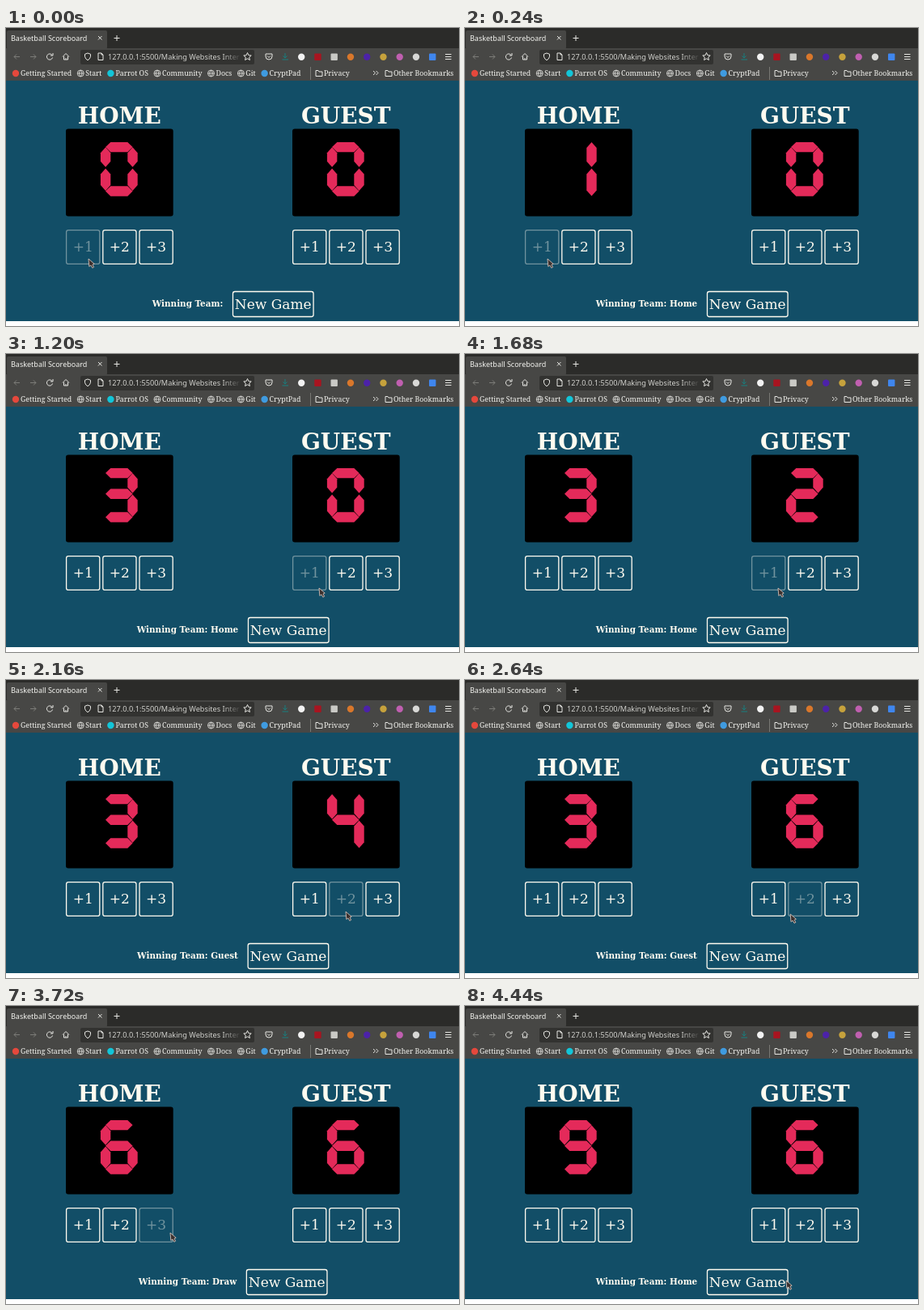
Write an HTML page that moves like this. It is 560 by 368 pixels and loops after 4.56 s.

```html
<!DOCTYPE html>
<html lang="en">
<head>
<meta charset="utf-8">
<title>Basketball Scoreboard</title>
<style>
  html, body { margin: 0; width: 100%; height: 100%; overflow: hidden; background: #fff; }
  svg { display: block; width: 560px; height: 368px; }
  .ui { font: 9px "Noto Sans", "Open Sans", sans-serif; fill: #f4f4f0; }
  .marks { font: 8.85px "Noto Serif", "DejaVu Serif", serif; fill: #f4f4f0; }
  .line { fill: none; stroke: #e6e6e2; }
  .page { font: 17px "DejaVu Serif", "Noto Serif", serif; fill: #fffbf0; text-anchor: middle; }
  .title { font-size: 28px; font-weight: bold; }
  .box { fill: none; stroke: #fffbf0; stroke-width: 1.3; }
  #label { font-size: 10.4px; font-weight: bold; text-anchor: start; }
  .hover { opacity: .4; }
  .digit { fill: #e42a5a; }
</style>
</head>
<body>
<svg viewBox="0 0 560 368">
  <defs>
    <linearGradient id="fade"><stop stop-color="#323230" stop-opacity="0"/><stop offset="1" stop-color="#323230"/></linearGradient>
    <path id="globe" class="line" stroke-width=".8" d="M-4 0a4 4 0 1 0 8 0a4 4 0 1 0-8 0h8M0-4q-3.500 4 0 8q3.500-4 0-8"/>
    <path id="folder" class="line" d="M-4 3.500v-7h3l1 1.500h4v5.500z"/>
  </defs>
  <rect width="560" height="25" fill="#2b2b29"/>
  <rect y="25" width="560" height="41" fill="#474745"/>
  <rect x="1" y="3" width="124" height="23" rx="2" fill="#474745"/>
  <rect x="92" y="27" width="215" height="18" rx="2" fill="#323230"/>
  <g class="ui">
    <text x="6" y="15.500">Basketball Scoreboard</text>
    <text x="126" y="38.700" font-size="9.200" fill="#d2d2ce">127.0.0.1:5500/Making Websites Inter</text>
  </g>
  <rect x="268" y="29" width="23" height="14" fill="url(#fade)"/>

  <g class="line">
    <path d="M114 10l4.500 4.500m0-4.500l-4.500 4.500M133.500 12.500h7m-3.500-3.500v7"/>
    <path d="M17 35.500h-7m3-3l-3 3 3 3M30 35.500h7m-3-3l3 3-3 3" stroke="#7d7d79"/>
    <path d="M57 33.500a3.600 3.600 0 1 0 .5 3M58 31v3h-3"/>
    <path d="M70 35.500l4-4 4 4M71.500 35v4h5v-4M74 39v-2"/>
    <path d="M101 31l3.500 1.300v3q-.6 3-3.500 4.500-2.900-1.500-3.500-4.500v-3z"/>
    <path d="M114 31h4l2 2v6.500h-6zM118 31v2h2"/>
    <path d="M298.500 30.500l1.400 3.100 3.300.4-2.500 2.200.7 3.300-2.900-1.700-2.900 1.700.7-3.300-2.500-2.200 3.300-.4z"/>
    <path d="M321 32h8v3a4 4 0 0 1-8 0zM323 34.500l2 2 2-2"/>
    <path d="M341.500 39h7.500M345 31v6m-2.500-2.500l2.500 2.500 2.500-2.500" stroke="#168080"/>
    <path d="M543 32.500h7.500m-7.500 3h7.500m-7.500 3h7.500"/>
    <path d="M376.500 48v16" stroke="#777773"/>
    <path d="M454 53l2.500 2.500-2.500 2.500m3.500-5l2.500 2.500-2.500 2.500"/>
  </g>
  <g id="badges"></g>
  <g id="bookmarks" class="marks"></g>

  <rect y="65" width="560" height="297" fill="#124e67"/>
  <g class="page">
    <g id="teams"></g>
    <text id="label" y="344"></text>
    <g id="newGame">
      <rect class="box" x=".7" y="325.500" width="99.600" height="31" rx="2.500"/>
      <text x="50.500" y="347">New Game</text>
    </g>
  </g>
  <path id="cursor" d="M0 0L.8 9.500 2.900 8 4.800 11.300 6.600 10.300 5 7.200 7.200 6.300Z"
        fill="#3b302e" stroke="#e6d0c6" stroke-width=".8" stroke-linejoin="round"/>
</svg>
<script>
const $ = id => document.getElementById(id);
const LOOP = 4560, TICK = 120;

function add(parent, tag, attrs, text) {
  const el = document.createElementNS("http://www.w3.org/2000/svg", tag);
  for (const key in attrs) el.setAttribute(key, attrs[key]);
  if (text) el.textContent = text;
  return parent.appendChild(el);
}

// Toolbar badges: evenly spaced discs and squares
"●#f2f2f2 ■#a81420 ■#c9c9c5 ●#d9772b ●#4c22a8 ●#c6a23c ●#c05fb0 ●#d8d8d6 ■#3f86ee".split(" ").forEach((badge, i) =>
  add($("badges"), "rect", {
    x: 361 + 20.25 * i, y: 31.5, width: 8.4, height: 8.4,
    rx: badge[0] === "●" ? 4.2 : 1, fill: badge.slice(1)
  }));

// Bookmarks flow from left to right, each as wide as its text
function addBookmarks(x, items) {
  for (const [name, icon] of items) {
    const g = add($("bookmarks"), "g", { transform: `translate(${x} 56)` });
    if (icon[0] === "#") add(g, "circle", { r: 4.2, fill: icon });
    else add(g, "use", { href: "#" + icon });
    x += add(g, "text", { x: 6, y: 3 }, name).getComputedTextLength() + 17;
  }
}
addBookmarks(12, [
  ["Getting Started", "#e5483c"], ["Start", "globe"], ["Parrot OS", "#12c5d8"], ["Community", "globe"],
  ["Docs", "globe"], ["Git", "globe"], ["CryptPad", "#3f9be0"]
]);
addBookmarks(387, [["Privacy", "folder"]]);
addBookmarks(473, [["Other Bookmarks", "folder"]]);

// Seven segments, lettered a to g in the usual order
const lit = ["abcdef", "bc", "abged", "abgcd", "fgbc", "afgcd", "afgedc", "abc", "abcdefg", "abcdfg"];
const MID_X = 139.8, MID_Y = 174.3, BAR = 6.2;

const flat = y => [[-16.8, 0], [-10.5, -BAR], [10.5, -BAR], [16.8, 0], [10.5, BAR], [-10.5, BAR]]
  .map(([dx, dy]) => [MID_X + dx, y + dy]);

function upright(x, top, bottom) {
  return [[x, top], [x + BAR, top + 7], [x + BAR, bottom - 7], [x, bottom], [x - BAR, bottom - 7], [x - BAR, top + 7]];
}

// An upright grows to fill the corner where no bar caps it
function segmentPoints(key, on) {
  const bar = "agd".indexOf(key);
  if (bar >= 0) return flat(MID_Y + (bar - 1) * 27.2 - (bar === 1 ? 1.5 : 0));
  const x = MID_X + ("bc".includes(key) ? 16.7 : -16.7);
  return "bf".includes(key)
    ? upright(x, on.includes("a") ? 147.3 : 141, 171.8)
    : upright(x, 173.5, on.includes("d") ? 201 : 207.5);
}

function makeTeam(name, dx) {
  const g = add($("teams"), "g", { transform: `translate(${dx})` });
  add(g, "text", { class: "title", x: 140.3, y: 118 }, name);
  add(g, "rect", { x: 74, y: 124.5, width: 132.7, height: 108, rx: 3, fill: "#000" });
  const digit = add(g, "g", { class: "digit" });
  const buttons = [1, 2, 3].map(points => {
    const x = 29.4 + 45.2 * points, el = add(g, "g", {});
    add(el, "rect", { class: "box", x, y: 249.6, width: 41.2, height: 41.8, rx: 2.5 });
    add(el, "text", { x: x + 20.6, y: 276 }, "+" + points);
    return { el, points, left: x + dx };
  });
  return { digit, buttons };
}
const home = makeTeam("HOME", 0), guest = makeTeam("GUEST", 280);

// Pointer: where it rests, and each eased move to a new spot along an arc
const rest = { x: 102, y: 285 };
const moves = [
  { from: 720, to: 1200, x: 387, y: 289, lift: 99 },
  { from: 1800, to: 2160, x: 420, y: 286, lift: 0 },
  { from: 2520, to: 3000, x: 135, y: 237, lift: -26 },
  { from: 3000, to: 3480, x: 203, y: 280, lift: 0 },
  { from: 3960, to: 4440, x: 397, y: 339, lift: 0 }
];
const clicks = [240, 480, 720, 1320, 1560, 2040, 2520, 3720, 3960];

const ease = k => k < .5 ? 4 * k ** 3 : 1 - 4 * (1 - k) ** 3;

function pointerAt(t) {
  let { x, y } = rest;
  for (const m of moves) {
    const k = ease(Math.min(1, Math.max(0, (t - m.from) / (m.to - m.from))));
    x += (m.x - x) * k;
    y += (m.y - y) * k - m.lift * 4 * k * (1 - k);
    if (k < 1) break;
  }
  return { x, y };
}

const isOver = (button, { x, y }) => x >= button.left && x <= button.left + 42 && y >= 249 && y <= 292;

// Each click adds the points of the button under the pointer
function scoreAt(team, t) {
  return clicks.filter(c => c <= t).reduce((sum, c) => {
    const hit = team.buttons.find(b => isOver(b, pointerAt(c)));
    return sum + (hit ? hit.points : 0);
  }, 0);
}

function showTeam(team, score, pointer) {
  const on = lit[score];
  team.digit.replaceChildren();
  for (const key of on) add(team.digit, "polygon", { points: segmentPoints(key, on).join(" ") });
  for (const b of team.buttons) b.el.classList.toggle("hover", isOver(b, pointer));
}

function draw(t) {
  const pointer = pointerAt(t), h = scoreAt(home, t), g = scoreAt(guest, t);
  showTeam(home, h, pointer);
  showTeam(guest, g, pointer);
  const winner = h > g ? " Home" : g > h ? " Guest" : h ? " Draw" : "";
  $("label").textContent = "Winning Team:" + winner;
  const width = $("label").getComputedTextLength(), left = 280.2 - (width + 111.5) / 2;
  $("label").setAttribute("x", left);
  $("newGame").setAttribute("transform", `translate(${left + width + 11.5})`);
  $("cursor").setAttribute("transform", `translate(${pointer.x} ${pointer.y})`);
}

const start = performance.now();
let last = -1;
function frame() {
  const t = Math.floor((performance.now() - start) % LOOP / TICK) * TICK;
  if (t !== last) draw(last = t);
  requestAnimationFrame(frame);
}
frame();
</script>
</body>
</html>
```
